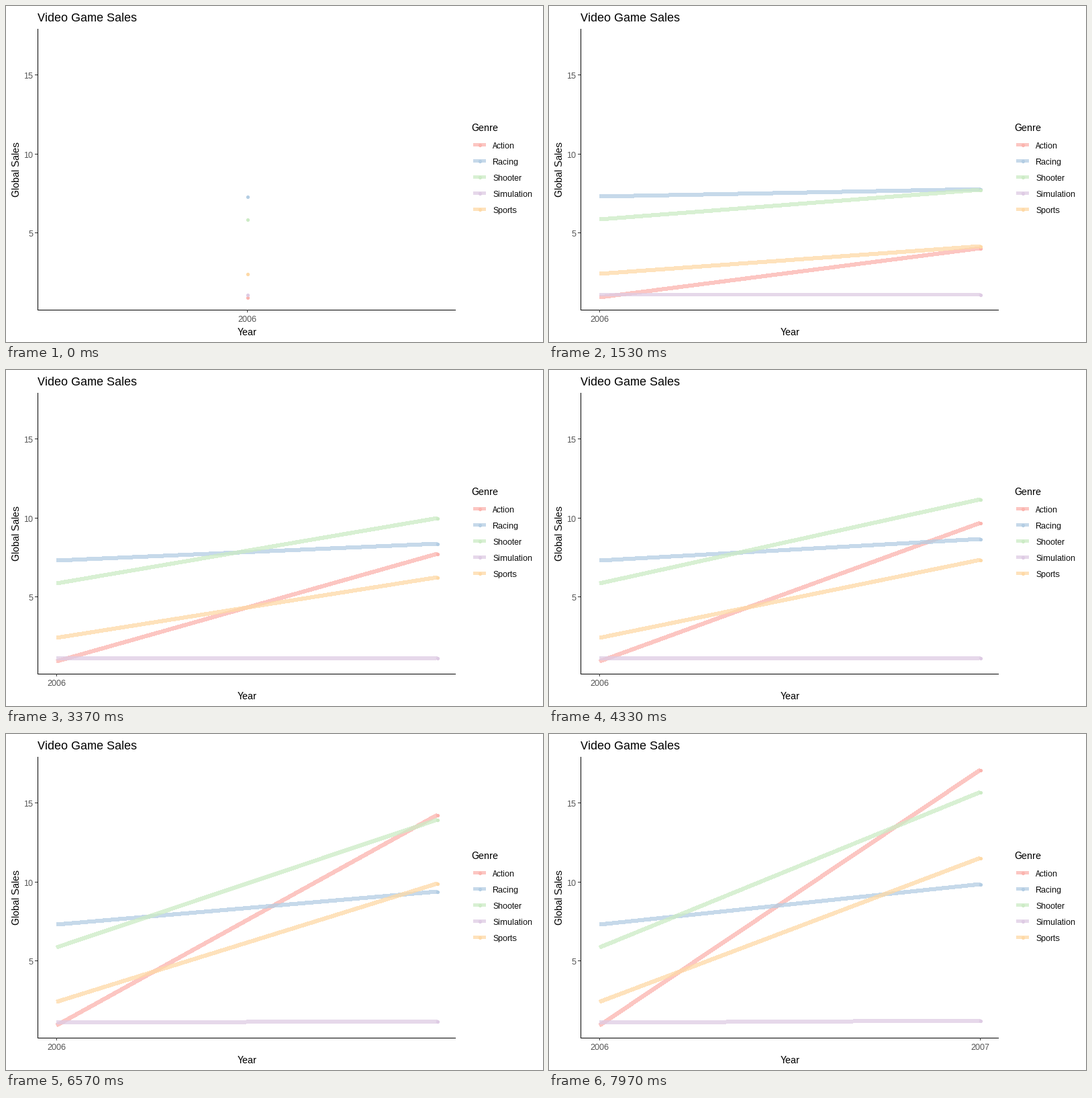
Write a matplotlib script that moves like this. It is 800 px wide and 500 px high and loops after 10 s.

```python
import matplotlib.pyplot as plt
from matplotlib.animation import FuncAnimation

W, H, DPI = 800, 500, 100
PX = 72 / DPI                      # one pixel in points
LOOP_MS, STEP_MS = 10000, 20
REVEAL_STEPS = 239                 # at 30 steps a second, then hold
LEFT, RIGHT, TOP, BOTTOM = 47, 670, 34, 452
X_START, X_END, X_MID = 75, 642, 359
GREY, TICK = "#4d4d4d", "#333333"
SMALL, MEDIUM, LARGE = 12, 15, 18  # text sizes in pixels

# genre: colour, height in pixels at the first and last year
SERIES = {
    "Action": ("#FBB4AE", 433.2, 53.4),
    "Racing": ("#B3CDE3", 283.2, 223.3),
    "Shooter": ("#CCEBC5", 317.3, 86.3),
    "Simulation": ("#DECBE4", 429.49, 426.4),
    "Sports": ("#FED9A6", 398.3, 184.3),
}

# whole-pixel glyph advances
plt.rcParams.update({"font.family": "Liberation Sans",
                     "text.hinting": "native", "text.hinting_factor": 1})
fig = plt.figure(figsize=(W / DPI, H / DPI), dpi=DPI, facecolor="white")
ax = fig.add_axes([0, 0, 1, 1])
ax.set_xlim(-0.5, W - 0.5)         # integer coordinates are pixel centres
ax.set_ylim(H - 0.5, -0.5)
ax.axis("off")


def rule(xs, ys, color="black"):
    return ax.plot(xs, ys, color=color, lw=PX, antialiased=False,
                   solid_capstyle="butt", snap=False)[0]


def label(x, y, text, size, color="black", ha="left"):
    return ax.text(x, y, text, fontsize=size * PX, color=color, ha=ha,
                   va="baseline")


def band(xs, ys, color):
    return ax.plot(xs, ys, color=color, alpha=0.75, lw=5 * PX, zorder=3,
                   antialiased=False, solid_capstyle="butt", snap=False)[0]


def dot(x, y, color):
    return ax.plot([x], [y], "o", color=color, ms=5.2 * PX, mew=0,
                   zorder=4, antialiased=False, snap=False)[0]


class YearTick:
    def __init__(self, year):
        self.mark = rule([0, 0], [BOTTOM - 0.5, BOTTOM + 3.5], TICK)
        self.text = label(0, 469.5, str(year), SMALL, GREY, "center")

    def place(self, x):
        visible = x is not None and x <= RIGHT
        self.mark.set_visible(visible)
        self.text.set_visible(visible)
        if visible:
            x = round(x)
            self.mark.set_xdata([x, x])
            self.text.set_x(x)


# axes and titles
rule([LEFT, LEFT], [TOP - 0.5, BOTTOM + 0.5])
rule([LEFT - 0.5, RIGHT - 0.5], [BOTTOM, BOTTOM])
for value, y in ((5, 337), (10, 220), (15, 102)):
    rule([LEFT - 4.5, LEFT - 0.5], [y, y], TICK)
    label(40, y + 5.5, str(value), SMALL, GREY, "right")
label(46.5, 22.5, "Video Game Sales", LARGE)
label(X_MID, 489.5, "Year", MEDIUM, ha="center")
ax.text(22.7, 243, "Global Sales", fontsize=MEDIUM * PX, rotation=90,
        ha="right", va="center")

# legend
label(692.5, 185.5, "Genre", MEDIUM)
for row, (genre, (color, _, _)) in enumerate(SERIES.items()):
    y = 206 + 24 * row
    band([695.5, 714.5], [y, y], color)
    dot(705, y, color)
    label(724.5, y + 5.5, genre, SMALL)

lines = [band([X_START, X_START], [y, y], c) for c, y, _ in SERIES.values()]
dots = [dot(X_MID, y, c) for c, y, _ in SERIES.values()]
first_year, last_year = YearTick(2006), YearTick(2007)


def draw(frame):
    ms = frame * STEP_MS + STEP_MS // 2
    # 30 steps a second, with step times rounded to 10 ms
    step = min((3 * ms + 10) // 100, REVEAL_STEPS)
    progress = step / REVEAL_STEPS
    started = progress > 0
    # the view always stretches from the first year to the current moment
    x_now = X_END if started else X_MID
    for line, point, (_, y0, y1) in zip(lines, dots, SERIES.values()):
        y = round(y0 + (y1 - y0) * progress)
        line.set_visible(started)
        line.set_data([X_START, X_END], [round(y0), y])
        point.set_data([x_now], [y])
    first_year.place(X_START if started else X_MID)
    last_year.place(X_START + (X_END - X_START) / progress if started else None)
    return [*lines, *dots]


anim = FuncAnimation(fig, draw, frames=LOOP_MS // STEP_MS,
                     init_func=lambda: draw(0), interval=STEP_MS,
                     repeat=True, blit=False)
plt.show()
```
